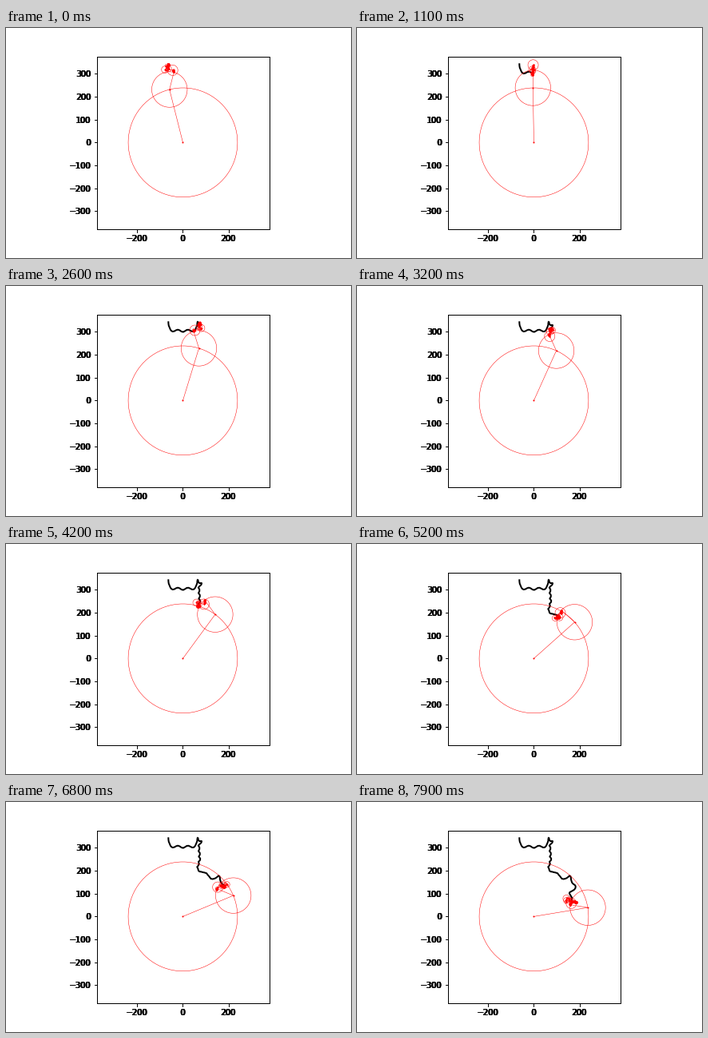
Animation, 432 px wide and 288 px high, one loop 8000 ms. Source, as a matplotlib script:

```python
import numpy as np
import matplotlib.pyplot as plt
from matplotlib.animation import FuncAnimation
from matplotlib.collections import LineCollection
from matplotlib.transforms import ScaledTranslation

FRAMES, PERIOD = 80, 300
T0 = 11.8        # time at which every arm stands upright
SCALE = 0.2865   # pixels per data unit
ORDER = 110      # highest harmonic
WAVE = 5.8       # ripple period in frames

# Radii of the slow harmonics; the fast ones are fitted to the outline.
SLOW = {-1: 238.7, 1: 77.5, -3: 1.7, 3: 1.7, -4: 3.5, 4: 3.5,
        -5: 3.5, 5: 3.5, -6: 5.2, 7: -22.7}

# Corners of the right half of the outline, in pixels from the centre.
CORNERS = np.array([
    0 + 87j, 14.5 + 87j, 17.5 + 91j, 18.6 + 99.5j, 20.5 + 94.3j,
    24.8 + 94.8j, 20 + 90.5j, 20.5 + 72j, 17 + 62j, 18.5 + 57.8j,
    28 + 55.5j, 34 + 47.8j, 38.5 + 48j, 44.5 + 52.3j, 46.5 + 43j,
    52 + 38.3j, 50.5 + 34j, 43.5 + 29.8j, 47.5 + 23.8j, 47.5 + 18.8j,
])

freqs = np.array([s * k for k in range(1, ORDER + 1) for s in (-1, 1)])


def walk(u):
    """Point on the outline, u frames from the axis at constant speed."""
    length = np.append(0, np.cumsum(np.abs(np.diff(CORNERS))))
    return np.interp(u, length * (FRAMES - 1 - T0) / length[-1], CORNERS)


def outline(t):
    """Outline with ripples across it, mirrored left of the axis."""
    u = np.abs(t - T0)
    ahead = walk(u + 0.5) - walk(u - 0.5)
    normal = 1j * ahead / np.maximum(np.abs(ahead), 1e-9)
    size = 0.8 * (1 + np.cos(2 * np.pi * u / 26)) / (1 + (u / 34) ** 8)
    turns = u / WAVE * np.where(u > 13, 2, 1)
    z = (walk(u) - normal * size * np.cos(2 * np.pi * turns)) / SCALE
    return np.where(t < T0, -z.conj(), z)


def fit_radii(arms, goal):
    """Ridge fit of the fast harmonics on top of the slow ones."""
    radii = np.array([SLOW.get(k, 0.0) for k in freqs])
    fast = np.abs(freqs) > 7
    rest = goal - arms @ radii
    ridge = np.diag(0.12 * np.sqrt(np.abs(freqs[fast])))
    rows = np.vstack([arms[:, fast].real, arms[:, fast].imag, ridge])
    rhs = np.concatenate([rest.real, rest.imag, np.zeros(fast.sum())])
    radii[fast] = np.linalg.lstsq(rows, rhs, rcond=None)[0]
    return radii


times = np.arange(FRAMES)
phase = 2 * np.pi / PERIOD * (times - T0)
arms = 1j * np.exp(1j * np.outer(phase, freqs))
radii = fit_radii(arms, outline(times))
joints = np.hstack([np.zeros((FRAMES, 1)), np.cumsum(arms * radii, axis=1)])
pen = joints[:, -1]
ring = np.exp(1j * np.linspace(0, 2 * np.pi, 91))

fig = plt.figure(figsize=(6, 4), dpi=72, facecolor="white")
box = [113.7 / 432, 36 / 288, 216.4 / 432, 216.4 / 288]

# Stacked copies, every other one a pixel to the left, thicken the labels.
for i in range(4):
    ax = fig.add_axes(box, label=f"layer{i}")
    ax.patch.set_visible(False)
    ax.set(xlim=(-376, 379), ylim=(-379, 376),
           xticks=range(-200, 201, 200), yticks=range(-300, 301, 100))
    shift = ScaledTranslation(-(i % 2) / 72, 0, fig.dpi_scale_trans)
    for label in ax.get_xticklabels() + ax.get_yticklabels():
        label.set_transform(label.get_transform() + shift)

trace, = ax.plot([], [], color="black", lw=2, zorder=2)
circles = LineCollection([], colors="red", linewidths=0.5, zorder=3)
ax.add_collection(circles, autolim=False)
chain, = ax.plot([], [], color="red", lw=0.5, marker="o", ms=2,
                 mew=0, zorder=4)


def draw(n):
    loops = joints[n, :-1, None] + np.abs(radii)[:, None] * ring
    circles.set_segments(np.stack([loops.real, loops.imag], axis=-1))
    chain.set_data(joints[n].real, joints[n].imag)
    trace.set_data(pen[:n + 1].real, pen[:n + 1].imag)
    return trace, circles, chain


anim = FuncAnimation(fig, draw, frames=FRAMES, interval=100,
                     repeat=True, repeat_delay=0, blit=False)
plt.show()
```
